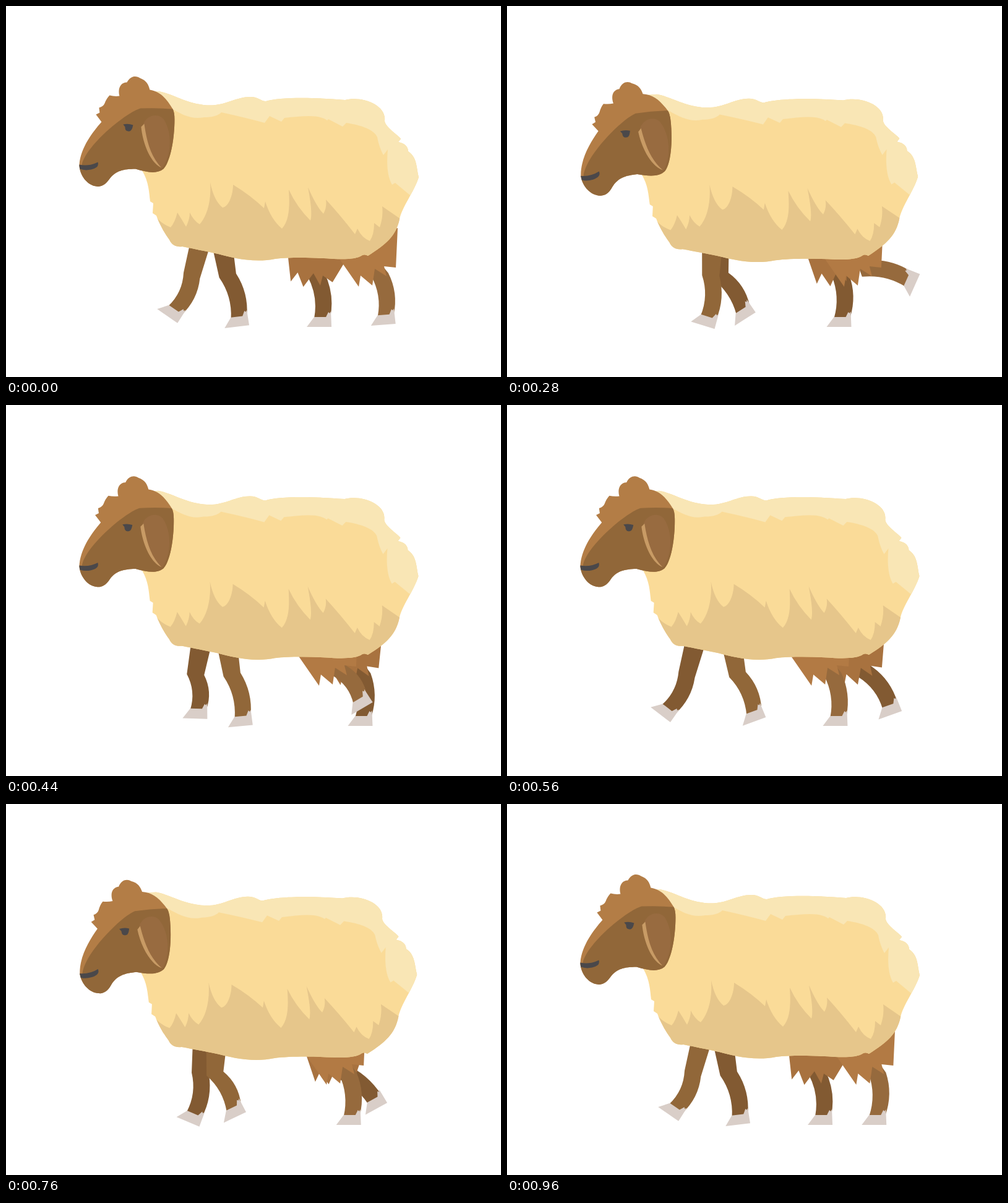
An HTML page for the animation above (1000 ms loop, 800x600 px).

```html
<!DOCTYPE html>
<html lang="en">
<head>
<meta charset="utf-8">
<title>Walking sheep</title>
<style>
html, body { margin: 0; width: 100%; height: 100%; overflow: hidden; background: #fff; }
svg { display: block; width: 100%; height: 100%; }
</style>
</head>
<body>
<svg viewBox="0 0 800 600">
  <defs>
    <path id="fleece" d="M230 139L247 138C270 142 290 158 325 160.500C355 162 370 147 395 147C408 147 412 154 420 154C440 148 490 147 548 152C575 145 615 160 612 185C611 195 638 212 638 215L634 220C645 222 650 228 650 235C665 245 663 262 667 277C660 300 640 325 636 345C630 372 615 385 585 404Q580 401 576 403C568 409 550 410 530 409C500 407 460 406 435 409C400 416 365 407 343 401C320 396 305 393 285 389C275 390 268 387 264 378C255 366 247 350 243 339L237 335L238 319L233 316C231 300 231 285 220 266Z"/>
    <clipPath id="inside"><use href="#fleece"/></clipPath>
  </defs>
  <g id="legs"></g>
  <g id="body">
    <use href="#fleece" fill="#fadb98"/>
    <g clip-path="url(#inside)">
      <path fill="#f9e6b5" d="M220 165L266 165C285 176 300 184 320 180Q340 180 348 172Q385 180 418 189L426 178L445 187L450 181C480 178 505 175 519 185L521 183L544 195L550 189C575 193 595 200 600 212C602 225 608 238 610 241L617 232C615 255 616 275 624 289L629 286L653 306L690 330L690 120L220 120Z"/>
      <path fill="#e6c68b" d="M230 330L240 338Q250 352 266 358Q273 350 277 334Q284 345 291 357Q297 345 297 334Q303 347 313 353C325 340 332 315 330 285Q336 315 350 326C360 325 367 305 367 289Q395 306 417 327L419 316Q428 345 446 360C460 345 458 315 457 297Q470 325 492 347Q496 335 488 293Q502 325 513 336Q519 325 517 313Q540 338 564 369L568 360Q575 375 588 380Q595 370 595 351L604 358Q610 340 608 324L637 344H690V430H220Z"/>
    </g>
  </g>
  <g id="head">
    <path fill="#b37d46" d="M155 188L146 176L152 173L151 165Q158 163 160 158Q163 150 168 145Q176 147 184 146C181 135 185 124 196 124C202 112 212 113 217 117C228 121 231 128 233 136C250 139 260 150 270 167Q273 172 273 184C273 210 268 250 255 264C245 272 230 270 210 264C190 264 178 267 168 280C160 292 152 293 146 292C132 290 120 275 119 258C121 230 140 205 155 188Z"/>
    <path fill="#916739" d="M270 167Q244 165 218 166C196 172 130 225 123 258H119C120 275 132 290 146 292C152 293 160 292 168 280C178 267 190 264 210 264C230 270 245 272 255 264C268 250 273 210 273 184Q273 172 270 167Z"/>
    <path fill="#986b40" d="M222 193C226 178 245 172 255 183C270 205 268 242 253 262C236 250 226 220 222 193Z"/>
    <path fill="#c89b65" d="M219 196L224 191C228 220 235 245 252 262C235 255 222 225 219 196Z"/>
    <path fill="#4a484a" d="M190 192Q198 190 206 193L205 197Q203 204 198 203Q193 203 193 196Z"/>
    <path fill="#4a484a" d="M119 257Q135 260 149 253Q152 262 138 265Q128 267 120 264Z"/>
  </g>
</svg>
<script>
const STEP = 40, LOOP = 1000, START = 40, STRIDE = 920;
const HOOF = 'M-25 20L-13 4L6 4L10 -4L12 -2L14 -5L15 20Z';
const TUFT = 'M0 0L3 -18L22 -2L26 -29L45 -17L41 -33L60 -31L63 -95L-45 -65Z';

const $ = id => document.getElementById(id);
const addPath = (fill, d = '') => {
  const p = document.createElementNS('http://www.w3.org/2000/svg', 'path');
  p.setAttribute('fill', fill);
  p.setAttribute('d', d);
  return $('legs').appendChild(p);
};
const move = (el, [x, y], deg) =>
  el.setAttribute('transform', `translate(${x} ${y}) rotate(${deg})`);

// Cosine swing over one stride; n = 2 gives the double beat
const wave = (u, amp, peak, n = 1) => amp * Math.cos(2 * Math.PI * n * (u - peak));

function frontPose(u, { dx }) {
  return {
    top: [338 + dx + wave(u, 24, 0.55), 380],
    knee: [336 + dx + wave(u, 37, 0.54), 436],
    ankle: [342 + dx + wave(u, 64, 0.57) + wave(u, 9, 0.29, 2),
            492 + wave(u, 7, 0.34) + wave(u, 2, 0.36, 2)],
    turn: 3 + wave(u, 34, 0.13) + wave(u, 9, 0.03, 2)
  };
}

function hindPose(u, { dx, lift, lean }) {
  const rise = lift * Math.max(0, wave(u, 1, 0.24));
  const x = 566 + dx + wave(u, 40, 0.05), y = 435 - 0.17 * rise;
  const tilt = lean * Math.max(0, 585 - x);
  return {
    top: [x - 4, y - 12],
    knee: [x, y],
    ankle: [589 + dx + wave(u, 55, 0.135) + wave(u, 13, 0.22, 2), 499 - rise],
    turn: -1.1 * rise,
    tuft: [x - 34 - 0.25 * tilt, 454 - 0.3 * tilt],
    tilt
  };
}

// The near hind leg falls short of a full stride, so it jumps at the loop
const legs = [
  { pose: frontPose, phase: 0.45, rate: 1, dx: -9, half: 17, color: '#825a32' },
  { pose: frontPose, phase: 0, rate: 1, dx: 0, half: 17, color: '#916739' },
  { pose: hindPose, phase: 0.53, rate: 1, dx: -25, half: 10, color: '#825a32',
    lift: 29, lean: 0.34, wool: '#a8723f' },
  { pose: hindPose, phase: 0, rate: 0.95, dx: 0, half: 10, color: '#966a3d',
    lift: 60, lean: 0, wool: '#b27a44' }
];
for (const leg of legs) {
  leg.limb = addPath(leg.color);
  leg.hoof = addPath('#d9cec8', HOOF);
  if (leg.wool) leg.tuft = addPath(leg.wool, TUFT);
}

const place = ([x, y], [ox, oy], deg) => {
  const a = deg * Math.PI / 180, c = Math.cos(a), s = Math.sin(a);
  return [ox + x * c - y * s, oy + x * s + y * c];
};
const shift = (p, n, d) => [p[0] + n[0] * d, p[1] + n[1] * d];
const mid = (p, q) => [(p[0] + q[0]) / 2, (p[1] + q[1]) / 2];
const text = p => p.map(v => v.toFixed(2)).join(' ');

// Unit vector pointing to the rear side of the line from p to q
function rearward(p, q) {
  const dx = q[0] - p[0], dy = q[1] - p[1], len = Math.hypot(dx, dy);
  return [dy / len, -dx / len];
}

// Straight thigh, shank bowed to the rear
function limbPath({ top, knee, ankle, turn }, half) {
  const n = rearward(top, ankle), bow = rearward(knee, ankle);
  const kneeL = shift(knee, n, -14), kneeR = shift(knee, n, 14);
  const endL = place([-13, 6], ankle, turn), endR = place([13, 5], ankle, turn);
  const ctrl = (p, q) => text(shift(mid(p, q), bow, 12));
  return `M${top[0] - half} ${top[1]}L${text(kneeL)}Q${ctrl(kneeL, endL)} ${text(endL)}` +
    `L${text(endR)}Q${ctrl(kneeR, endR)} ${text(kneeR)}L${top[0] + half} ${top[1]}Z`;
}

function drawLeg(leg, u) {
  const pose = leg.pose(u * leg.rate + leg.phase, leg);
  leg.limb.setAttribute('d', limbPath(pose, leg.half));
  move(leg.hoof, pose.ankle, pose.turn);
  if (leg.tuft) move(leg.tuft, pose.tuft, pose.tilt);
}

function draw(ms) {
  const t = Math.max(START, Math.floor(ms % LOOP / STEP) * STEP);
  const u = (t - START) / STRIDE;
  const dip = 0.5 - wave(u, 0.5, 0, 2);
  $('body').setAttribute('transform', `rotate(${-0.8 * dip} 590 480)`);
  $('head').setAttribute('transform', `translate(-0.6 -0.4) rotate(${-6.2 * dip} 288 258)`);
  legs.forEach(leg => drawLeg(leg, u));
}

let origin;
function tick(now) {
  origin ??= now;
  draw(now - origin);
  requestAnimationFrame(tick);
}
draw(0);
requestAnimationFrame(tick);
</script>
</body>
</html>
```
